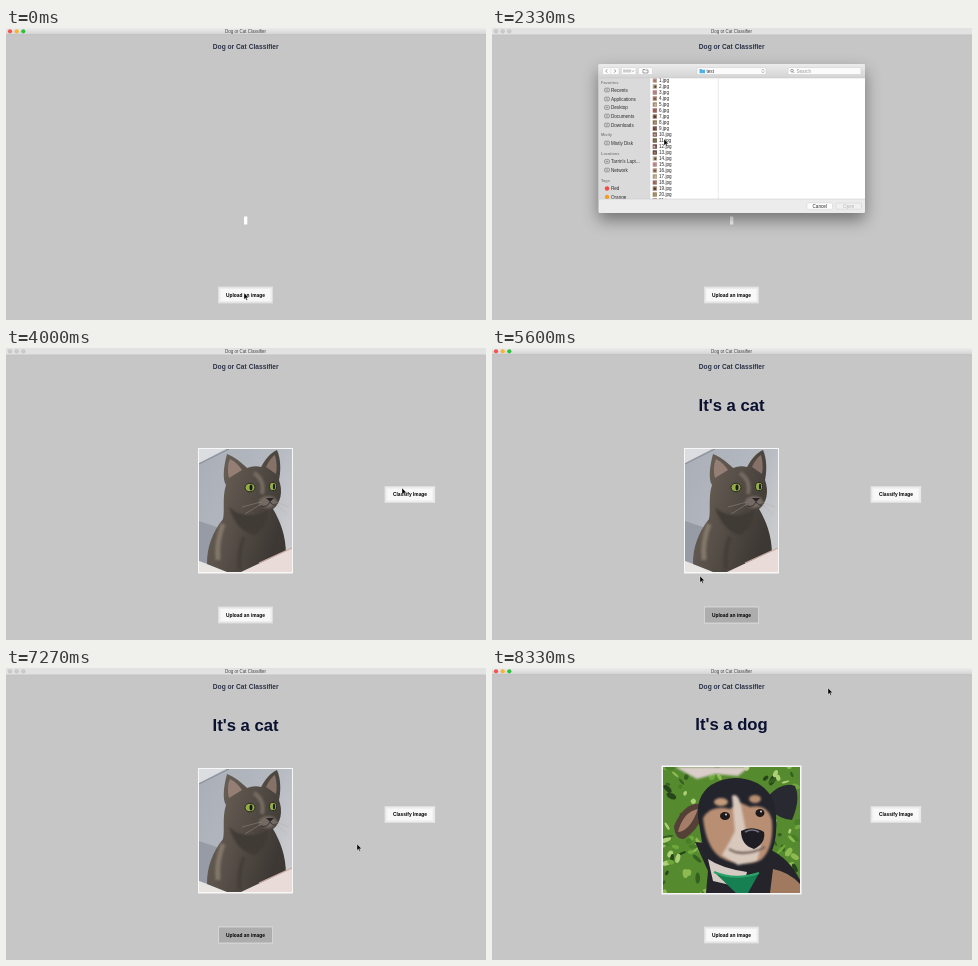
An HTML page for the animation above (8.39 s loop, 480 px wide and 292 px high).

```html
<!DOCTYPE html>
<html lang="en">
<head>
<meta charset="utf-8">
<title>Dog or Cat Classifier</title>
<style>
html, body { margin: 0; width: 100%; height: 100%; overflow: hidden; background: #c6c6c6; }
svg { display: block; }
svg text { font-family: "Liberation Sans", Arial, sans-serif; }
.mid { text-anchor: middle; }
.end { text-anchor: end; }
.bold { font-weight: bold; }
.label { font-size: 4.87px; font-weight: bold; text-anchor: middle; }
.result { font-size: 16.66px; font-weight: bold; text-anchor: middle; fill: #0a1030; }
.side { font-size: 4.6px; fill: #2c2c2c; }
.head { font-size: 3.9px; font-weight: bold; fill: #858585; }
.info { font-size: 4.15px; fill: #333; }
.dim { fill: #858585; }
.icon { fill: none; stroke: #666; stroke-width: .6; }
.panel { filter: drop-shadow(0 7px 8px rgba(0, 0, 0, .42)); }

.clip { animation: 8.39s step-end infinite; }
#inactive { animation-name: inactive; }
#blank { animation-name: blank; }
#dialog { animation-name: dialog; }
#pickCat { animation-name: pickCat; }
#pickDog { animation-name: pickDog; }
#catPhoto { animation-name: catPhoto; }
#dogPhoto { animation-name: dogPhoto; }
#classify { animation-name: classify; }
#catText { animation-name: catText; }
#dogText { animation-name: dogText; }
#uploadDown { animation-name: uploadDown; }
#classifyDown { animation-name: classifyDown; }
#cursor { animation-name: cursor; }

@keyframes inactive { 0%, 48.4%, 92.9% { opacity: 0 } 14.25%, 67.5% { opacity: 1 } }
@keyframes blank { 0% { opacity: 1 } 42.1% { opacity: 0 } }
@keyframes dialog { 0%, 41.27%, 85.77% { opacity: 0 } 14.25%, 67.5% { opacity: 1 } }
@keyframes pickCat { 0%, 42% { opacity: 0 } 30.15% { opacity: 1 } }
@keyframes pickDog { 0% { opacity: 0 } 77.03% { opacity: 0 } 77.8% { opacity: 1 } }
@keyframes catPhoto { 0%, 87.35% { opacity: 0 } 42.1% { opacity: 1 } }
@keyframes dogPhoto { 0% { opacity: 0 } 87.35% { opacity: 1 } }
@keyframes classify { 0% { opacity: 0 } 42.1% { opacity: 1 } }
@keyframes catText { 0%, 87.35% { opacity: 0 } 51.6% { opacity: 1 } }
@keyframes dogText { 0% { opacity: 0 } 94.5% { opacity: 1 } }
@keyframes uploadDown { 0%, 87.35% { opacity: 0 } 63.5% { opacity: 1 } }
@keyframes classifyDown { 0%, 51.6%, 94.5% { opacity: 0 } 49.2%, 92.92% { opacity: 1 } }

/* The pointer moves in fifteenths of a second. */
@keyframes cursor {
  0% { transform: translate(238px, 265px) }
  3.9% { transform: translate(235px, 264px) }
  10.3% { transform: translate(222px, 214px) }
  11.1% { transform: translate(210px, 172px) }
  14.25% { transform: translate(210px, 172px); animation-timing-function: steps(12) }
  23.8% { transform: translate(172px, 120px); animation-timing-function: steps(5) }
  27.75% { transform: translate(172px, 111px) }
  30.15% { transform: translate(172px, 111px); animation-timing-function: steps(10) }
  38.1% { transform: translate(346px, 176px) }
  41.27% { transform: translate(346px, 176px); animation-timing-function: steps(8) }
  47.62% { transform: translate(396px, 140px); animation-timing-function: steps(3) }
  50% { transform: translate(398px, 143px); animation-timing-function: steps(5) }
  53.98% { transform: translate(299px, 198px) }
  55.57% { transform: translate(299px, 198px); animation-timing-function: steps(9) }
  62.7% { transform: translate(238px, 274px) }
  64.3% { transform: translate(238px, 274px); animation-timing-function: steps(3) }
  66.7% { transform: translate(208px, 228px); animation-timing-function: steps(2) }
  68.28% { transform: translate(273px, 198px) }
  69.87% { transform: translate(273px, 198px); animation-timing-function: steps(7) }
  75.43% { transform: translate(179px, 156px) }
  77.8% { transform: translate(179px, 156px); animation-timing-function: steps(7) }
  83.38% { transform: translate(351px, 176px) }
  88.15% { transform: translate(351px, 176px); animation-timing-function: steps(6) }
  92.92% { transform: translate(397px, 142px) }
  94.5% { transform: translate(397px, 142px); animation-timing-function: steps(4) }
  97.68% { transform: translate(379px, 127px); animation-timing-function: steps(2) }
  99.28%, 100% { transform: translate(336px, 20px) }
}
</style>
</head>
<body>
<svg width="480" height="292" viewBox="0 0 480 292">
  <defs>
    <linearGradient id="bar" x2="0" y2="1"><stop stop-color="#ececec"/><stop offset="1" stop-color="#d3d3d3"/></linearGradient>
    <linearGradient id="wall" x2="1" y2=".6"><stop stop-color="#a9aeb8"/><stop offset=".6" stop-color="#b4b8c0"/><stop offset="1" stop-color="#c9cacd"/></linearGradient>
    <linearGradient id="fur" x2="1" y2=".5"><stop stop-color="#71685d"/><stop offset=".45" stop-color="#5b534b"/><stop offset="1" stop-color="#3d3834"/></linearGradient>
    <linearGradient id="blue" x2="0" y2="1"><stop stop-color="#4f92f2"/><stop offset="1" stop-color="#0c5cdc"/></linearGradient>
    <filter id="soft"><feGaussianBlur stdDeviation=".9"/></filter>

    <symbol id="cat" viewBox="0 0 93 123">
      <path d="M0 0H93V123H0Z" fill="url(#wall)"/>
      <path d="M0 0H27L0 14Z" fill="#dcdde0"/>
      <path d="M0 15 30 0" stroke="#858a94" stroke-width="1"/>
      <path d="M0 72 18 78 10 116 0 112Z" fill="#969ba6"/>
      <path d="M0 112 30 123H0Z" fill="#e7e4e2"/>
      <path d="M27 36C23 30 25 16 28 5 36 8 43 14 48 19Q55 16 62 18C66 11 71 4 78 1 82 10 82 22 80 31 84 42 82 54 74 60 81 72 87 86 87 106L60 123H28L8 115C8 98 13 84 24 70 26 62 23 48 27 36Z" fill="url(#fur)"/>
      <path d="M30 29C28 22 29 14 31 10 37 13 41 18 43 21Z" fill="#957f75"/>
      <path d="M67 18C70 11 74 7 76 6 78 13 78 20 77 25Z" fill="#857168"/>
      <g filter="url(#soft)">
        <path d="M30 58Q46 73 70 61 68 78 56 86 38 83 30 58Z" fill="#403a35"/>
        <path d="M24 75Q17 94 19 111" fill="none" stroke="#827769" stroke-width="5"/>
        <path d="M45 88Q39 103 41 120" fill="none" stroke="#443e38" stroke-width="4"/>
        <path d="M55 24Q66 31 63 45" fill="none" stroke="#766c62" stroke-width="4"/>
        <ellipse cx="69" cy="53" rx="9" ry="6" fill="#756b63"/>
      </g>
      <path d="M93 99 42 123H93Z" fill="#e9dcd8"/>
      <path d="M93 99 60 114" stroke="#c9aba4" stroke-width="1.2"/>
      <g fill="#94ad48" stroke="#292823" stroke-width="1">
        <ellipse cx="51" cy="38.500" rx="5" ry="4.300"/><ellipse cx="74" cy="37.500" rx="3.500" ry="4.200"/>
      </g>
      <ellipse cx="52" cy="38.500" rx="1.500" ry="3" fill="#171d12"/><ellipse cx="75" cy="37.500" rx="1.100" ry="3" fill="#171d12"/>
      <path d="M67 49H75L71 53Z" fill="#292526"/>
      <path d="M71 53Q68 59 62 57M71 53Q75 58 78 55" fill="none" stroke="#2d2927" stroke-width=".8"/>
      <path d="M62 53 43 58M62 55 46 65M77 53 90 58M77 55 88 65" stroke="#b1aaa1" stroke-width=".35"/>
    </symbol>

    <symbol id="dog" viewBox="0 0 137 126">
      <path d="M0 0H137V126H0Z" fill="#568a2f"/>
      <g id="leaves"></g>
      <path d="M12 0H86L75 9 52 7 34 12Z" fill="#dacdca" filter="url(#soft)"/>
      <path d="M32 75 45 104 43 126H137V113Q126 91 106 82Z" fill="#25242a"/>
      <path d="M45 92Q58 101 84 105L80 121 50 114Z" fill="#d6cbc4"/>
      <path d="M110 102Q126 105 137 117V126H107Z" fill="#a1795f"/>
      <path d="M38 37Q21 35 11 59 12 73 21 72 34 64 41 47Z" fill="#544037"/>
      <path d="M35 42Q20 45 15 65 27 64 35 42Z" fill="#a57d69"/>
      <path d="M105 29Q120 14 132 19 138 32 129 53 116 52 108 43Z" fill="#292932"/>
      <path d="M35 50Q33 29 48 18 70 5 94 16 111 25 113 47 115 70 108 87 94 103 73 99 49 94 39 75Z" fill="#23242c"/>
      <g filter="url(#soft)">
        <path d="M40 51Q48 37 67 42L76 35 87 40Q105 36 109 54 111 81 98 93 78 102 57 90 43 80 40 51Z" fill="#b98f73"/>
        <path d="M69 29Q75 25 78 39L83 65 98 79 94 94 75 98 59 88Q67 75 72 64Z" fill="#d9c9bd"/>
        <ellipse cx="58" cy="35" rx="7" ry="4" fill="#c39a7a"/><ellipse cx="92" cy="32" rx="6" ry="4" fill="#b98e70"/>
        <path d="M66 82Q80 91 102 80" fill="none" stroke="#69554e" stroke-width="2.500"/>
      </g>
      <ellipse cx="62" cy="49" rx="5" ry="4" fill="#211a1a"/><ellipse cx="97" cy="46" rx="4.500" ry="4" fill="#211a1a"/>
      <circle cx="63" cy="47.500" r="1" fill="#d9dcde"/><circle cx="98" cy="44.500" r="1" fill="#d9dcde"/>
      <path d="M78 64Q89 58 101 65 103 76 91 82 78 78 78 64Z" fill="#1d1d23"/>
      <path d="M82 65Q89 61 96 65" fill="none" stroke="#72717b" stroke-width="1.600"/>
      <path d="M51 105Q72 114 96 106L85 126H73Z" fill="#168052"/>
      <path d="M51 105Q72 114 96 106" fill="none" stroke="#2da26b" stroke-width="2"/>
    </symbol>

    <g id="key">
      <rect width="55" height="17" fill="#dedede"/>
      <rect x="1" y="1" width="53" height="15" fill="#ececec"/>
      <rect x="2.500" y="2.500" width="50" height="12" fill="#f8f8f8"/>
    </g>
    <clipPath id="body"><path d="M106.500 50H373V171H106.500Z"/></clipPath>
  </defs>

  <rect width="480" height="292" fill="#c6c6c6"/>
  <rect width="480" height="6.500" fill="url(#bar)"/>
  <path d="M0 6.700H480" stroke="#b4b4b4" stroke-width=".5"/>
  <circle cx="4" cy="3.300" r="2.100" fill="#f4544d"/><circle cx="10.700" cy="3.300" r="2.100" fill="#f8b42c"/><circle cx="17.300" cy="3.300" r="2.100" fill="#2cc23e"/>
  <g id="inactive" class="clip">
    <rect width="480" height="6.500" fill="#e2e2e2"/>
    <g fill="#cbcbcb" stroke="#b9b9b9" stroke-width=".4"><circle cx="4" cy="3.300" r="1.900"/><circle cx="10.700" cy="3.300" r="1.900"/><circle cx="17.300" cy="3.300" r="1.900"/></g>
  </g>
  <text class="mid" x="239.500" y="4.900" font-size="4.450" fill="#444">Dog or Cat Classifier</text>
  <text class="mid bold" x="239.700" y="20.600" font-size="6.670" fill="#2b3249">Dog or Cat Classifier</text>
  <rect id="blank" class="clip" x="238" y="188.500" width="3.300" height="8" fill="#fff"/>

  <g id="catPhoto" class="clip">
    <rect x="192" y="100" width="95" height="125.500" fill="#f7f7f7"/>
    <use href="#cat" x="193" y="101" width="93" height="123"/>
  </g>
  <g id="dogPhoto" class="clip">
    <rect x="169.500" y="97.500" width="140" height="129" fill="#f7f7f7"/>
    <use href="#dog" x="171" y="99" width="137" height="126"/>
  </g>
  <text id="catText" class="clip result" x="239.500" y="63">It's a cat</text>
  <text id="dogText" class="clip result" x="239.500" y="62.300">It's a dog</text>

  <use href="#key" x="212" y="258.500"/>
  <g id="uploadDown" class="clip">
    <rect x="212" y="258.500" width="55" height="17" fill="#d4d4d4"/><rect x="213" y="259.500" width="53" height="15" fill="#adadad"/>
  </g>
  <text class="label" x="239.500" y="268.500">Upload an image</text>
  <g id="classify" class="clip">
    <use href="#key" transform="translate(378.500 138) scale(.92 1)"/>
    <g id="classifyDown" class="clip"><rect x="378.500" y="138" width="50.600" height="17" fill="#d4d4d4"/><rect x="379.500" y="139" width="48.600" height="15" fill="#adadad"/></g>
    <text class="label" x="404" y="148.100">Classify Image</text>
  </g>

  <g id="dialog" class="clip">
    <rect class="panel" x="106.500" y="36" width="266.500" height="149" rx="1.500" fill="#ececec"/>
    <path d="M106.500 50V37.500Q106.500 36 108 36H371.500Q373 36 373 37.500V50Z" fill="url(#bar)"/>
    <g fill="#fbfbfb" stroke="#c3c3c3" stroke-width=".4">
      <rect x="110.500" y="39.500" width="16.500" height="7" rx="1.200"/><rect x="129.500" y="39.500" width="14.500" height="7" rx="1.200"/>
      <rect x="146.500" y="39.500" width="14" height="7" rx="1.200"/><rect x="205" y="39.500" width="69" height="7" rx="1.200"/>
      <rect x="296" y="39.500" width="73" height="7" rx="1.200"/>
    </g>
    <path d="M118.750 39.500V46.500" stroke="#ccc" stroke-width=".4"/>
    <path class="icon" d="M115.300 41.300 113.700 43 115.300 44.700M122.200 41.300 123.800 43 122.200 44.700M132 41.500V44.500M134 41.500V44.500M136 41.500V44.500M138 41.500V44.500M140 42.500 141 43.500 142 42.500M151 41.500H153L153.500 42H156V45H151ZM270 42.400 271 41.300 272 42.400M270 43.600 271 44.700 272 43.600"/>
    <path d="M207.500 41H209.500L210.200 41.700H213V45.300H207.500Z" fill="#50b1e8"/>
    <text x="214.500" y="44.600" font-size="4.600" fill="#333">test</text>
    <circle class="icon" cx="300" cy="42.700" r="1.300"/><path class="icon" d="M301 43.700 302 44.900"/>
    <text x="304.500" y="44.600" font-size="4.600" fill="#999">Search</text>

    <g clip-path="url(#body)">
      <rect x="106.500" y="50" width="51.500" height="121" fill="#dadada"/>
      <rect x="158" y="50" width="215" height="121" fill="#fff"/>
      <path d="M226.300 50V171M158 50V171" stroke="#d5d5d5" stroke-width=".5"/>
      <g id="sidebar"></g>
      <g id="files"></g>
      <g id="pickCat" class="clip">
        <g class="pick" data-n="11" data-size="14"></g>
        <use href="#cat" x="276" y="56" width="47" height="63"/>
      </g>
      <g id="pickDog" class="clip">
        <g class="pick" data-n="18" data-size="26"></g>
        <use href="#dog" x="265" y="56" width="69" height="63"/>
      </g>
    </g>
    <path d="M106.500 50H373M106.500 171H373" stroke="#c4c4c4" stroke-width=".5"/>
    <g fill="#fff" stroke="#c6c6c6" stroke-width=".4"><rect x="315" y="175" width="25.500" height="6.200" rx="1"/><rect x="344" y="175" width="25.500" height="6.200" rx="1" fill="#f0f0f0"/></g>
    <text class="mid" x="327.700" y="179.800" font-size="4.600" fill="#222">Cancel</text>
    <text class="mid" x="356.700" y="179.800" font-size="4.600" fill="#b5b5b5">Open</text>
    <g class="clip" style="animation-name: pickCat"><g class="open"></g></g>
    <g class="clip" style="animation-name: pickDog"><g class="open"></g></g>
  </g>

  <path id="cursor" class="clip" d="M0 0V6.400L1.500 5.100 2.500 7.300 3.500 6.900 2.500 4.700H4.500Z" fill="#000" stroke="#fff" stroke-width=".35"/>
</svg>
<script>
const $ = id => document.getElementById(id);
const text = (cls, x, y, s, extra = "") => `<text class="${cls}" x="${x}" y="${y}" ${extra}>${s}</text>`;
const rowY = n => 52.5 + (n - 1) * 6;

let seed = 7;
const rand = () => (seed = seed * 16807 % 2147483647) / 2147483647;

// Foliage behind the dog
const greens = ["#345f20", "#477e26", "#6fa83a", "#8dbb52", "#25451b", "#add078"];
let leaves = "";
for (let i = 0; i < 170; i++) {
  const x = rand() * 137, y = rand() * 126;
  leaves += `<ellipse rx="${2 + rand() * 4}" ry="${1 + rand() * 2}" fill="${greens[i % 6]}" transform="translate(${x} ${y}) rotate(${rand() * 180})"/>`;
}
$("leaves").innerHTML = leaves;

const places = [
  ["Favorites", 54.5], ["Recents", 62, 1], ["Applications", 71, 1], ["Desktop", 79.5, 1], ["Documents", 88, 1], ["Downloads", 97, 1],
  ["Mistly", 107], ["Mistly Disk", 115, 1], ["Locations", 126], ["Tarrin's Lapt...", 133.5, 1], ["Network", 142, 1],
  ["Tags", 153], ["Red", 160.5, "#f5493f"], ["Orange", 169, "#f79a22"]
];
$("sidebar").innerHTML = places.map(([name, y, icon]) => {
  if (!icon) return text("head", 109, y + 1.4, name);
  const mark = icon === 1
    ? `<rect class="icon" x="112.700" y="${y - 1.8}" width="4.600" height="3.600" rx=".8"/><path class="icon" d="M114 ${y}h2"/>`
    : `<circle cx="115" cy="${y}" r="2.200" fill="${icon}"/>`;
  return mark + text("side", 119, y + 1.6, name);
}).join("");

const thumb = n => {
  const y = rowY(n), h = n * 67 % 50;
  return `<rect x="160.700" y="${y - 2.2}" width="4.200" height="4.400" fill="hsl(${h} 22% ${28 + n * 37 % 40}%)"/>` +
    `<circle cx="${162.3 + n % 3 * .5}" cy="${y + .3}" r="1.200" fill="hsl(${h} 25% ${75 - n * 23 % 55}%)"/>`;
};
const fileRow = (n, color) => thumb(n) + text("", 167, rowY(n) + 1.6, n + ".jpg", `font-size="4.600" fill="${color}"`);
$("files").innerHTML = Array.from({ length: 21 }, (_, i) => fileRow(i + 1, "#222")).join("");

const date = "Friday, September 20, 2013 at 10:12 AM";
const facts = [["Created", date], ["Modified", date], ["Last opened", "Today, 3:14 PM"]];
for (const el of document.querySelectorAll(".pick")) {
  const n = +el.dataset.n, y = rowY(n);
  el.innerHTML =
    `<rect x="158" y="${y - 2.8}" width="68" height="5.700" fill="#0b57d0"/>` + fileRow(n, "#fff") +
    text("bold", 232.5, 133.6, n + ".jpg", 'font-size="6.200" fill="#222"') +
    text("info dim", 232.5, 140.2, `JPEG image - ${el.dataset.size} KB`) +
    '<path d="M232.500 143.800H366" stroke="#ddd" stroke-width=".4"/>' +
    text("bold", 233, 150.4, "Information", 'font-size="4.700" fill="#222"') +
    text("end bold", 365.5, 150.4, "Show More", 'font-size="4.100" fill="#1672df"') +
    facts.map(([k, v], i) => text("info dim", 233, 159 + i * 6.6, k) + text("info end", 366, 159 + i * 6.6, v)).join("");
}
for (const el of document.querySelectorAll(".open")) {
  el.innerHTML = '<rect x="344" y="175" width="25.500" height="6.200" rx="1" fill="url(#blue)"/>' +
    text("mid", 356.7, 179.8, "Open", 'font-size="4.600" fill="#fff"');
}
</script>
</body>
</html>
```
